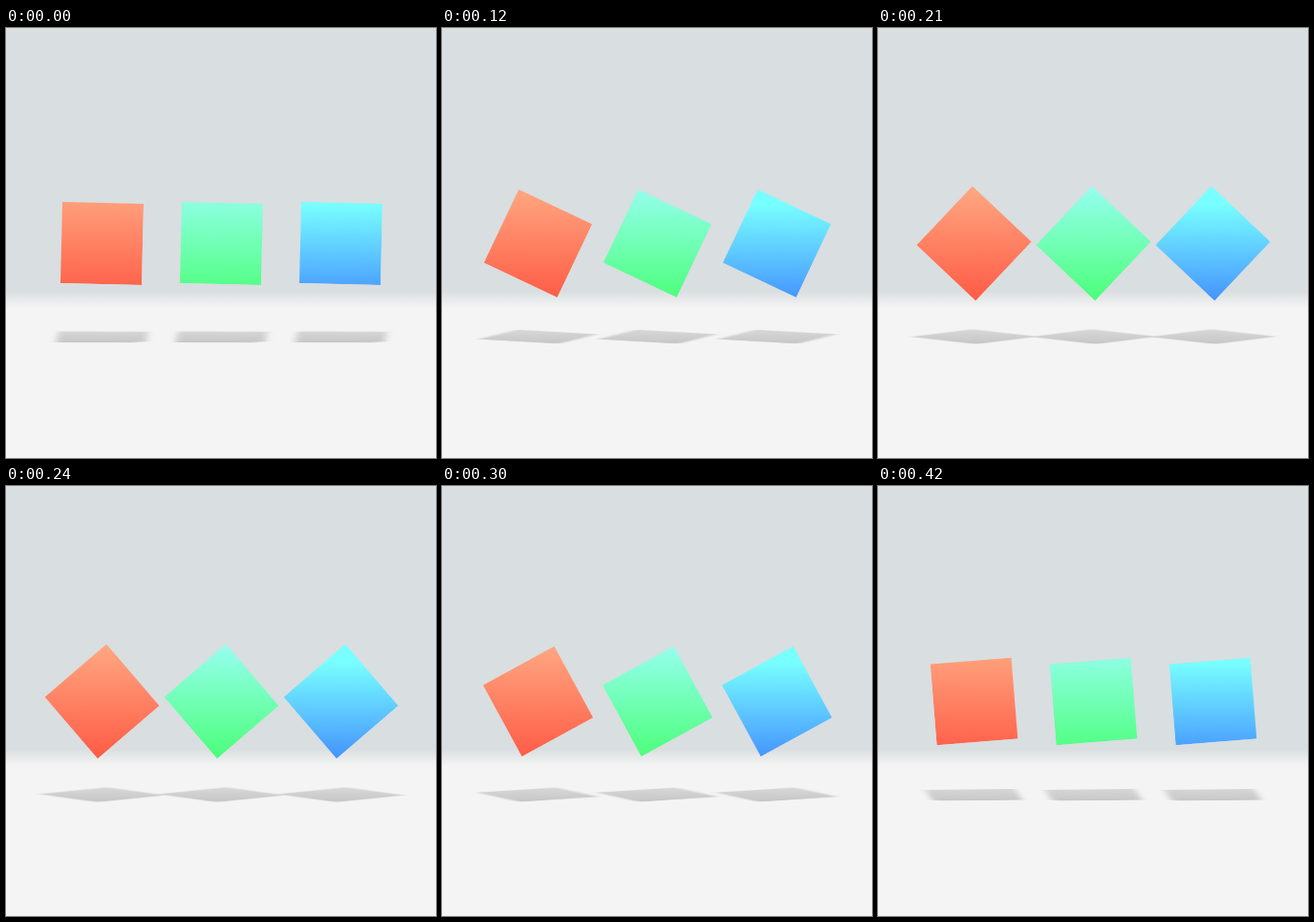
Recreate the animation shown at these times as an HTML page. Size 450 px wide and 450 px high, loop 0.45 s.

```html
<!DOCTYPE html>
<html lang="en">
<head>
<meta charset="utf-8">
<title>Spinning squares</title>
<style>
  html, body {
    margin: 0;
    width: 100%;
    height: 100%;
    overflow: hidden;
  }
  body {
    position: relative;
    background: linear-gradient(#d9dee0 275px, #f4f4f4 293px);
  }
  .shadow, .square {
    position: absolute;
    left: var(--x);
    width: 0;
    height: 0;
  }
  .square {
    top: 225px;
    filter: blur(0.6px);
  }
  .shadow {
    top: 322.7px;
    transform: scale(1.1, 0.13);
    filter: blur(3.6px);
  }
  /* The tile turns; its fill turns back so the gradient stays upright. */
  .tile {
    position: absolute;
    left: -42.5px;
    top: -42.5px;
    width: 85px;
    height: 85px;
    overflow: hidden;
    animation: turn 450ms steps(15) infinite;
  }
  .tile::before {
    content: "";
    position: absolute;
    inset: -17.5px;
    background: var(--fill);
    animation: turn-back 450ms steps(15) infinite;
  }
  .shadow .tile { --fill: linear-gradient(#d8d8d8, #c5c5c5); }
  .red { --fill: linear-gradient(#ffa882, #ff5a44); }
  .green { --fill: linear-gradient(#96fff0, #4bff78); }
  .blue { --fill: linear-gradient(#78ffff 18px, #4492ff); }

  @keyframes turn {
    from { transform: rotate(1.4deg); }
    to { transform: rotate(91.4deg); }
  }
  @keyframes turn-back {
    from { transform: rotate(-1.4deg); }
    to { transform: rotate(-91.4deg); }
  }
</style>
</head>
<body>
  <div style="--x: 100px">
    <div class="shadow"><div class="tile"></div></div>
    <div class="square red"><div class="tile"></div></div>
  </div>
  <div style="--x: 225px">
    <div class="shadow"><div class="tile"></div></div>
    <div class="square green"><div class="tile"></div></div>
  </div>
  <div style="--x: 350px">
    <div class="shadow"><div class="tile"></div></div>
    <div class="square blue"><div class="tile"></div></div>
  </div>
</body>
</html>
```
